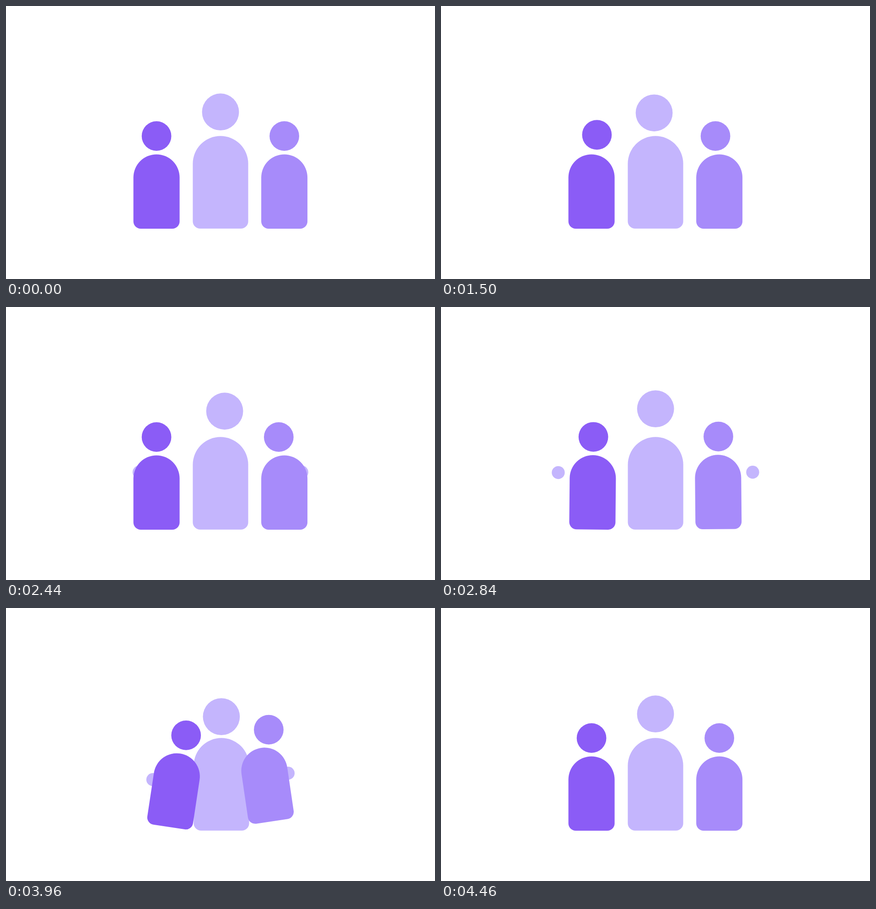
These frames come from a looping animation (938 by 597 pixels, 4500 ms). An HTML page:

```html
<!DOCTYPE html>
<html lang="en">
<head>
<meta charset="utf-8">
<title>Team hug</title>
<style>
  html, body { margin: 0; width: 100%; height: 100%; overflow: hidden; background: #fff; }
  svg { display: block; width: 938px; height: 597px; }
</style>
</head>
<body>
<svg id="stage" viewBox="0 0 938 597"></svg>
<script>
const LOOP = 4500;
const DARK = '#8b5cf6', MID = '#a78bfa', LIGHT = '#c4b5fd';
const stage = document.getElementById('stage');

function add(tag, fill, attrs) {
  const el = document.createElementNS('http://www.w3.org/2000/svg', tag);
  el.setAttribute('fill', fill);
  for (const key in attrs) el.setAttribute(key, attrs[key]);
  stage.appendChild(el);
  return el;
}

const disc = (fill, r) => add('circle', fill, { r });

// Arched body, drawn around the centre of its dome
function torso(fill, r, h, c = 16) {
  const d = `M${-r} 0A${r} ${r} 0 0 1 ${r} 0V${h - c}A${c} ${c} 0 0 1 ${r - c} ${h}` +
            `H${c - r}A${c} ${c} 0 0 1 ${-r} ${h - c}Z`;
  return add('path', fill, { d });
}

// Painted in this order, back to front
const parts = {
  handL: disc(LIGHT, 14.2),
  handR: disc(LIGHT, 14.2),
  bodyC: torso(LIGHT, 60.6, 141.9),
  headC: disc(LIGHT, 40.4),
  bodyL: torso(DARK, 50.5, 112),
  headL: disc(DARK, 32.4),
  bodyR: torso(MID, 50.5, 112),
  headR: disc(MID, 32.4)
};

// Poses: x, y, rotation in degrees
const rest = {
  handL: [329, 361.2, 0], handR: [608.6, 361.2, 0],
  bodyC: [469, 344.9, 0], headC: [469, 231.7, 0],
  bodyL: [329.1, 375, 0], headL: [329.1, 284.4, 0],
  bodyR: [608.6, 375, 0], headR: [608.6, 284.4, 0]
};
const lookLeft = { ...rest, headL: [347.3, 280.3, 0], headC: [454.7, 233.8, 0] };
const lookRight = { ...rest, headC: [487, 233.8, 0], headR: [584.4, 284.4, 0] };
const reach = { ...rest, headC: [469, 221.6, 0], handL: [252.1, 361.2, 0], handR: [685.8, 361.2, 0] };
const hug = {
  handL: [321, 375.3, 0], handR: [616.9, 361.2, 0],
  bodyC: [471, 344.9, 0], headC: [470.9, 237.6, 0],
  bodyL: [373.4, 368.2, 8.6], headL: [393.9, 278.4, 0],
  bodyR: [564.9, 355.8, -8.4], headR: [574.4, 266.1, 0]
};

// cubic-bezier(.42, 0, .58, 1)
function easeInOut(p) {
  let lo = 0, hi = 1;
  for (let i = 0; i < 20; i++) {
    const s = (lo + hi) / 2, q = 1 - s;
    const x = 1.26 * s * q * q + 1.74 * s * s * q + s * s * s;
    if (x < p) lo = s; else hi = s;
  }
  return lo * lo * (3 - 2 * lo);
}

// Damped spring: mass 1, stiffness 300, damping 20
function spring(ms) {
  const t = ms / 1000, w = Math.sqrt(200);
  return 1 - Math.exp(-10 * t) * (Math.cos(w * t) + 10 / w * Math.sin(w * t));
}

const glide = len => ms => ms >= len ? 1 : easeInOut(ms / len);

const moves = [
  { at: 580, to: lookLeft, ease: glide(420) },
  { at: 1295, to: lookRight, ease: glide(500) },
  { at: 2200, to: reach, ease: glide(485) },
  { at: 2819, to: hug, ease: spring },
  { at: 3945, to: rest, ease: glide(515) }
];

function draw(t) {
  let from = rest, to = rest, k = 0;
  for (const move of moves) {
    if (t < move.at) break;
    from = to;
    to = move.to;
    k = move.ease(t - move.at);
  }
  for (const name in parts) {
    const [x, y, a] = from[name].map((v, i) => v + (to[name][i] - v) * k);
    parts[name].setAttribute('transform',
      `translate(${x.toFixed(3)} ${y.toFixed(3)}) rotate(${a.toFixed(3)})`);
  }
}

const start = performance.now();
function tick() {
  draw((performance.now() - start) % LOOP);
  requestAnimationFrame(tick);
}
tick();
</script>
</body>
</html>
```
